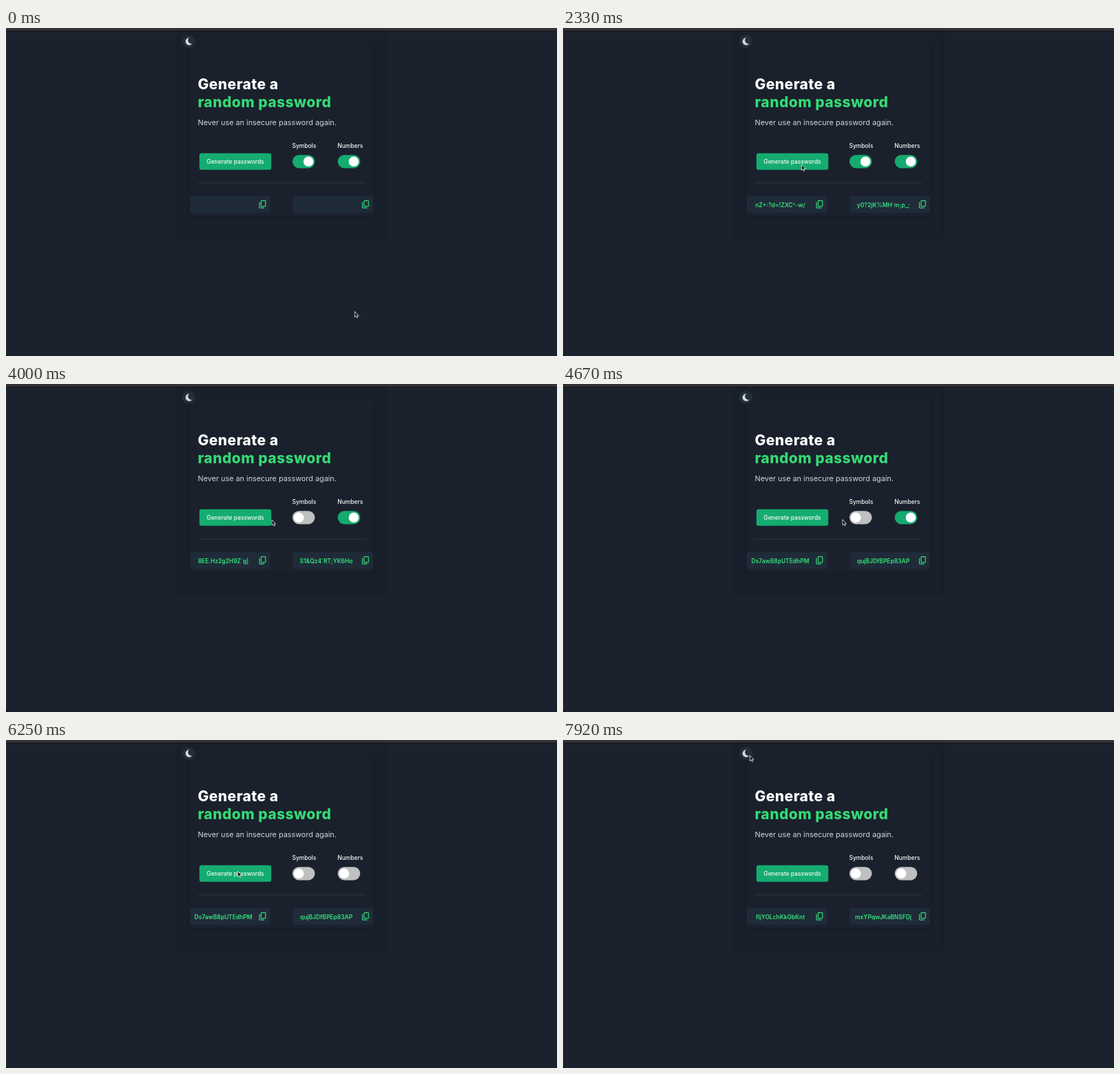
These frames come from a looping animation (800 by 476 pixels, 8 s). An HTML page:

```html
<!DOCTYPE html>
<html lang="en">
<head>
<meta charset="utf-8">
<title>Password generator</title>
<style>
  html, body { margin: 0; width: 100%; height: 100%; overflow: hidden; background: #1b222d; }
  svg { display: block; width: 100%; height: 100%; }
  text { font-family: Inter, "Open Sans", sans-serif; white-space: pre; }
  .title { font-size: 21px; font-weight: 800; letter-spacing: .45px; }
  .lead { font-size: 10.83px; fill: #d3d7dc; }
  .small { font-size: 8.45px; font-weight: 500; fill: #f8fafa; }
  .pass { font-size: 8.45px; font-weight: 600; fill: #35e57d; text-anchor: middle; }
  .icon { fill: none; stroke: #34d976; stroke-width: 1.2; stroke-linejoin: round; stroke-linecap: round; }
  .field { fill: #1f2b39; }
</style>
</head>
<body>
<svg viewBox="0 0 800 476" preserveAspectRatio="none">
  <defs>
    <filter id="soft" x="-10%" y="-10%" width="120%" height="120%"><feGaussianBlur stdDeviation="2.5"/></filter>
    <g id="copy" class="icon">
      <rect x="3" y=".6" width="6.4" height="8.2" rx=".8"/>
      <path d="M.6 3V10.4Q.6 11.2 1.4 11.2H7"/>
    </g>
  </defs>

  <rect width="800" height="476" fill="#1b222d"/>
  <rect width="800" height="4" fill="#343133"/>
  <rect y="4" width="800" height="1" fill="#11161e"/>
  <rect y="5" width="1" height="471" fill="#2b333d"/>
  <path d="M0 472V476H4Q0 476 0 472ZM800 472V476H796Q800 476 800 472Z" fill="#080a0d"/>

  <rect x="250" y="7" width="302" height="298" rx="3" fill="#000" opacity=".2" filter="url(#soft)"/>
  <rect x="251" y="5" width="299" height="298" rx="3" fill="#1a202b"/>
  <rect x="265" y="22" width="270" height="253" rx="3" fill="#000" opacity=".07" filter="url(#soft)"/>
  <rect x="267" y="20" width="266" height="253" rx="3" fill="#1a212c"/>

  <circle cx="265.3" cy="19.4" r="9.3" fill="#222e3b"/>
  <path d="M266.3 14.1A5.4 5.4 0 1 0 270.3 22.8A4.9 4.9 0 0 1 266.3 14.1Z" fill="#d5d8db"/>

  <text class="title" x="278.5" y="89" fill="#fff">Generate a</text>
  <text class="title" x="278.5" y="114.5" fill="#35d975">random password</text>
  <text class="lead" x="278.5" y="141">Never use an insecure password again.</text>

  <rect x="280.8" y="181.8" width="104.4" height="24" rx="3" fill="#15ac70"/>
  <text class="small" x="333" y="197" text-anchor="middle">Generate passwords</text>
  <text class="small" x="415.5" y="174">Symbols</text>
  <text class="small" x="481.3" y="174">Numbers</text>
  <g id="symbols" transform="translate(415.8 184.2)">
    <rect width="32.7" height="19.2" rx="9.6"/><circle cy="9.6" r="7.3" fill="#fff"/>
  </g>
  <g id="numbers" transform="translate(481.6 184.2)">
    <rect width="32.7" height="19.2" rx="9.6"/><circle cy="9.6" r="7.3" fill="#fff"/>
  </g>

  <rect x="278.5" y="224.3" width="243" height="1" fill="#2a3643"/>
  <rect class="field" x="267" y="244" width="116.5" height="24.6" rx="3"/>
  <rect class="field" x="416.5" y="244" width="116.5" height="24.6" rx="3"/>
  <text id="left" class="pass" x="315.5" y="259.8"></text>
  <text id="right" class="pass" x="465" y="259.8"></text>
  <use href="#copy" x="367.4" y="250"/>
  <use href="#copy" x="516.9" y="250"/>

  <g id="cursor" stroke-linejoin="round">
    <path id="arrow" stroke="#fff" stroke-width=".75" fill="#0b0d10"
      d="M.4 .4V8.4L2.2 6.8L3.5 9.5L4.8 8.9L3.6 6.4H6Z"/>
    <path id="hand" stroke="#111519" stroke-width=".75" fill="#fff"
      d="M.2 5.3V1.2Q.8 .4 1.4 1.2V3.5Q2.2 3.1 2.6 3.8Q3.5 3.5 3.7 4.2Q4.7 4 4.8 5Q4.8 7 3.9 8.6H.2L-1.8 5.7Q-1.3 4.5 .2 5.3Z"/>
  </g>
</svg>
<script>
const LOOP = 8000;
const $ = id => document.getElementById(id);

// time, x, y of the pointer tip
const path = [
  [0, 506, 411], [80, 506, 411], [830, 346, 198], [2800, 346, 198],
  [3290, 434, 196], [3720, 434, 196], [4230, 350, 197], [4380, 350, 197],
  [5080, 498, 195], [5640, 498, 195], [6250, 336, 190], [6400, 338, 191],
  [7220, 338, 191], [7920, 271, 22], [LOOP, 271, 22]
];

const passwords = [
  [0, "", ""],
  [1250, "k4&Tq]W9=rbX;2N", "Vh}7c*Jm3P~uE8/"],
  [1750, "R%6y<Lw2K:fZ+9d", "g8QxA!n5#HtU_c3"],
  [2160, "nZ+:?d=!ZXC^-w/", "y0?2jK%MH`m;p_;"],
  [2750, "8EE.Hz2g2H9Z`g|", "S1&Qz4`RT;YK6Ho"],
  [4330, "Ds7awB8pUTEdhPM", "qujBJDfBPEp83AP"],
  [6750, "fIjYOLchKkGbKnt", "mxYPqwJKaBNSFDj"]
];

const ease = p => p * p * (3 - 2 * p);
const mix = (a, b, p) => a + (b - a) * p;
const ramp = (t, start, length) => ease(Math.min(1, Math.max(0, (t - start) / length)));

function pointerAt(t) {
  const i = path.findIndex(k => k[0] > t);
  const [t0, x0, y0] = path[i - 1], [t1, x1, y1] = path[i];
  const p = ramp(t, t0, t1 - t0);
  return [mix(x0, x1, p), mix(y0, y1, p)];
}

function setSwitch(id, off) {
  const [track, thumb] = $(id).children;
  const on = [21, 170, 111], gray = [190, 192, 193];
  track.setAttribute("fill", `rgb(${on.map((c, i) => Math.round(mix(c, gray[i], off)))})`);
  thumb.setAttribute("cx", mix(23.3, 9.4, off));
}

function draw(t) {
  const [, left, right] = passwords.filter(k => k[0] <= t).pop();
  $("left").textContent = left;
  $("right").textContent = right;
  setSwitch("symbols", ramp(t, 3340, 160));
  setSwitch("numbers", ramp(t, 5340, 160));

  const [x, y] = pointerAt(t);
  const overSwitch = y > 184 && y < 203.5 && (x > 416 && x < 449 || x > 481 && x < 515);
  $("cursor").setAttribute("transform", `translate(${x} ${y})`);
  $("arrow").setAttribute("visibility", overSwitch ? "hidden" : "visible");
  $("hand").setAttribute("visibility", overSwitch ? "visible" : "hidden");
}

const began = performance.now();
function tick() {
  draw((performance.now() - began) % LOOP);
  requestAnimationFrame(tick);
}
tick();
</script>
</body>
</html>
```
